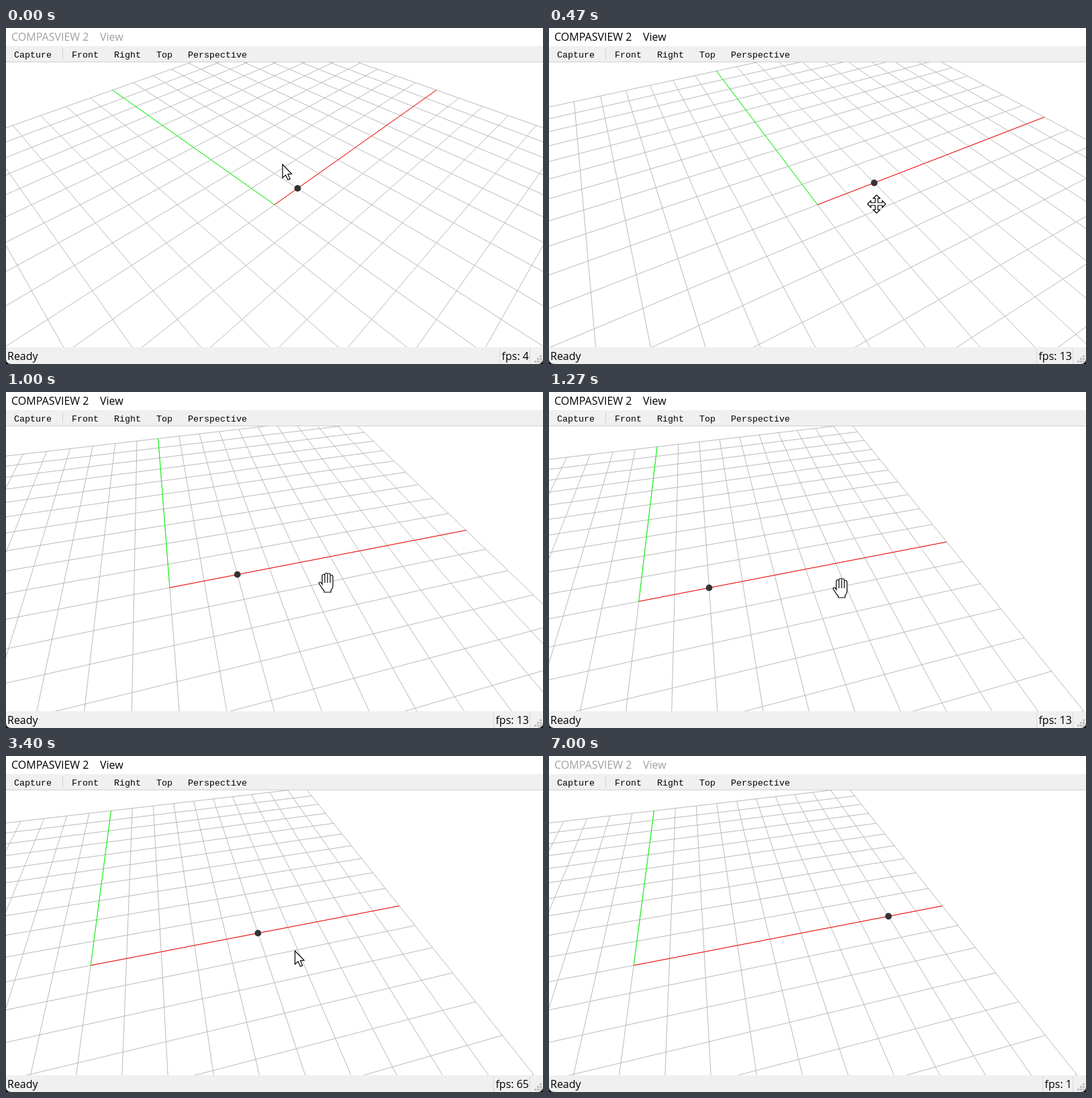
Write an HTML page with a canvas that moves like this. It is 800 by 500 pixels and loops after 7070 ms.

```html
<!DOCTYPE html>
<html lang="en">
<head>
<meta charset="utf-8">
<title>Viewer</title>
<style>
html, body { margin: 0; width: 100%; height: 100%; overflow: hidden; background: #fff; }
canvas { display: block; }
</style>
</head>
<body>
<canvas id="stage" width="800" height="500"></canvas>
<script>
const g = document.getElementById('stage').getContext('2d');
const LOOP = 7070;
const UI = '16px "Open Sans", "Noto Sans", sans-serif';
const MONO = '13.333px "Liberation Mono", monospace';
const BAR = '#f0f0f0';

// View: 45 degree lens, 424 px high, camera 10 units from the origin
const CX = 400, CY = 263, DIST = 10, SIZE = 10, NEAR = 0.5;
const FOCAL = 212 / Math.tan(Math.PI / 8);

// Pointer path: time, x, y
const PATH = [
  [0, 412, 203], [70, 412, 203], [270, 459, 261], [470, 488, 262],
  [630, 511, 262], [770, 538, 273], [1000, 477, 284], [1270, 434, 292],
  [1330, 431, 292], [1470, 431, 292], [1530, 430.5, 290],
  [5870, 430.5, 290], [6000, 345, 350], [6130, 134.5, 489]
];
const ORBIT = [270, 630], PAN = [770, 1330];

const clamp = (v, a, b) => Math.min(b, Math.max(a, v));

// Screen refresh: 15 per second, on whole hundredths
function tick(t) {
  const start = k => Math.round(k * 20 / 3) * 10;
  let k = Math.floor(t * 0.015 + 0.06);
  if (start(k) > t) k--;
  return start(k);
}

function pointer(t) {
  let i = 1;
  while (i < PATH.length - 1 && PATH[i][0] < t) i++;
  const [t0, x0, y0] = PATH[i - 1], [t1, x1, y1] = PATH[i];
  const u = clamp((t - t0) / (t1 - t0), 0, 1);
  return [x0 + (x1 - x0) * u, y0 + (y1 - y0) * u];
}

// How far the pointer has been dragged within a time span
function drag(t, [from, to]) {
  const a = pointer(from), b = pointer(clamp(t, from, to));
  return [b[0] - a[0], b[1] - a[1]];
}

function camera(t) {
  const [rx, ry] = drag(t, ORBIT), [px, py] = drag(t, PAN);
  const turn = Math.PI / 4 - rx * 0.01, tilt = Math.PI / 4 - ry * 0.01;
  const c = Math.cos(turn), s = Math.sin(turn);
  const ct = Math.cos(tilt), st = Math.sin(tilt);
  return (x, y) => {
    const depth = y * c + x * s;
    return [x * c - y * s + px * 0.05, depth * ct - py * 0.05, DIST + depth * st];
  };
}

const project = ([x, y, z]) => [CX + FOCAL * x / z, CY - FOCAL * y / z];

function clipNear(p, q) {
  if (p[2] >= NEAR) return p;
  const u = (NEAR - p[2]) / (q[2] - p[2]);
  return p.map((v, i) => v + (q[i] - v) * u);
}

function line(cam, x0, y0, x1, y1, color) {
  const p = cam(x0, y0), q = cam(x1, y1);
  if (p[2] < NEAR && q[2] < NEAR) return;
  g.beginPath();
  g.moveTo(...project(clipNear(p, q)));
  g.lineTo(...project(clipNear(q, p)));
  g.strokeStyle = color;
  g.stroke();
}

function scene(t) {
  const cam = camera(t);
  g.save();
  g.beginPath();
  g.rect(0, 51, 800, 424);
  g.clip();
  g.lineWidth = 1;
  for (let i = -SIZE; i <= SIZE; i++) {
    line(cam, i, -SIZE, i, SIZE, '#b9b9b9');
    line(cam, -SIZE, i, SIZE, i, '#b9b9b9');
  }
  line(cam, 0, 0, SIZE, 0, '#f00');
  line(cam, 0, 0, 0, SIZE, '#0f0');
  const step = 1 + Math.floor((t + 600) / 1000);
  const [x, y] = project(cam(step, 0));
  g.beginPath();
  g.arc(x, y, 4.9, 0, 7);
  g.fillStyle = '#333';
  g.fill();
  g.restore();
}

function rect(x, y, w, h, color) {
  g.fillStyle = color;
  g.fillRect(x, y, w, h);
}

function text(s, x, y, font, color = '#000', align = 'left') {
  g.font = font;
  g.fillStyle = color;
  g.textAlign = align;
  g.fillText(s, x, y);
}

function fps(t) {
  return t < 470 ? 4 : t < 1530 ? 13 : t < 3470 ? 65 : t < 6470 ? 2 : 1;
}

function chrome(t) {
  const title = t < 70 || t >= 7000 ? '#a0a0a0' : '#000';
  text('COMPASVIEW 2', 8, 19, UI, title);
  text('View', 140, 19, UI, title);

  rect(0, 27, 800, 24, BAR);
  rect(0, 50, 800, 1, '#cfcfcf');
  rect(84, 31, 1, 15, '#d0d0d0');
  [['Capture', 12], ['Front', 98], ['Right', 161], ['Top', 224], ['Perspective', 271]]
    .forEach(([s, x]) => text(s, x, 44, MONO));

  rect(0, 475, 800, 25, BAR);
  const rate = fps(t);
  rect(rate > 9 ? 726 : 735, 476, 1, 24, '#d9d9d9');
  rect(780, 476, 1, 24, '#d9d9d9');
  text('Ready', 2, 494, UI);
  text('fps: ' + rate, 779, 494, UI, '#000', 'right');
  for (let i = 0; i < 3; i++)
    for (let j = 2 - i; j < 3; j++) rect(787 + 4 * i, 487 + 4 * j, 3, 3, '#bfbfbf');

  // Rounded lower window corners
  g.fillStyle = '#000';
  for (const [x, d] of [[0, 1], [800, -1]]) {
    g.beginPath();
    g.moveTo(x, 492);
    g.quadraticCurveTo(x, 500, x + 8 * d, 500);
    g.lineTo(x, 500);
    g.fill();
  }
}

const ARROW = new Path2D('M0 0V20L4.6 15.8L8 23L11.2 21.6L8 14.6L13.6 14Z');
const HAND = new Path2D('M-6 2V-10Q-6 -12.5 -4 -12.5T-2 -11V-12.5Q-2 -14.5 0 -14.5T2 -12.5' +
  'Q2 -14 4 -14T6 -12V-10Q6 -11.5 8 -11.5T10 -9V5Q10 8 7 11V14H-3V12Q-6 9 -8 5' +
  'L-10.5 1.5Q-11 -1 -9 -1Q-7.5 -1 -6 2Z');
const FINGERS = new Path2D('M-2 -11V0M2 -12V0M6 -10V0');
const MOVE = new Path2D();
for (const [c, s] of [[1, 0], [0, 1], [-1, 0], [0, -1]])
  for (const [x, y] of [[-2, -2], [-2, -8.5], [-5, -8.5], [0, -13.5], [5, -8.5], [2, -8.5]])
    MOVE.lineTo(x * c - y * s, x * s + y * c);
MOVE.closePath();

function cursor(t) {
  if (t >= 6200) return;
  const orbit = t >= ORBIT[0] && t < 670, pan = t >= PAN[0] && t < 1530;
  const shape = orbit ? MOVE : pan ? HAND : ARROW;
  g.save();
  g.translate(...pointer(t));
  g.lineWidth = 1.2;
  g.fillStyle = '#fff';
  g.strokeStyle = '#000';
  g.fill(shape);
  g.stroke(shape);
  if (pan) g.stroke(FINGERS);
  g.restore();
}

function draw(now) {
  const t = tick(now % LOOP);
  rect(0, 0, 800, 500, '#fff');
  scene(t);
  chrome(t);
  cursor(t);
}

const begin = performance.now();
function loop() {
  draw(performance.now() - begin);
  requestAnimationFrame(loop);
}
loop();
</script>
</body>
</html>
```
